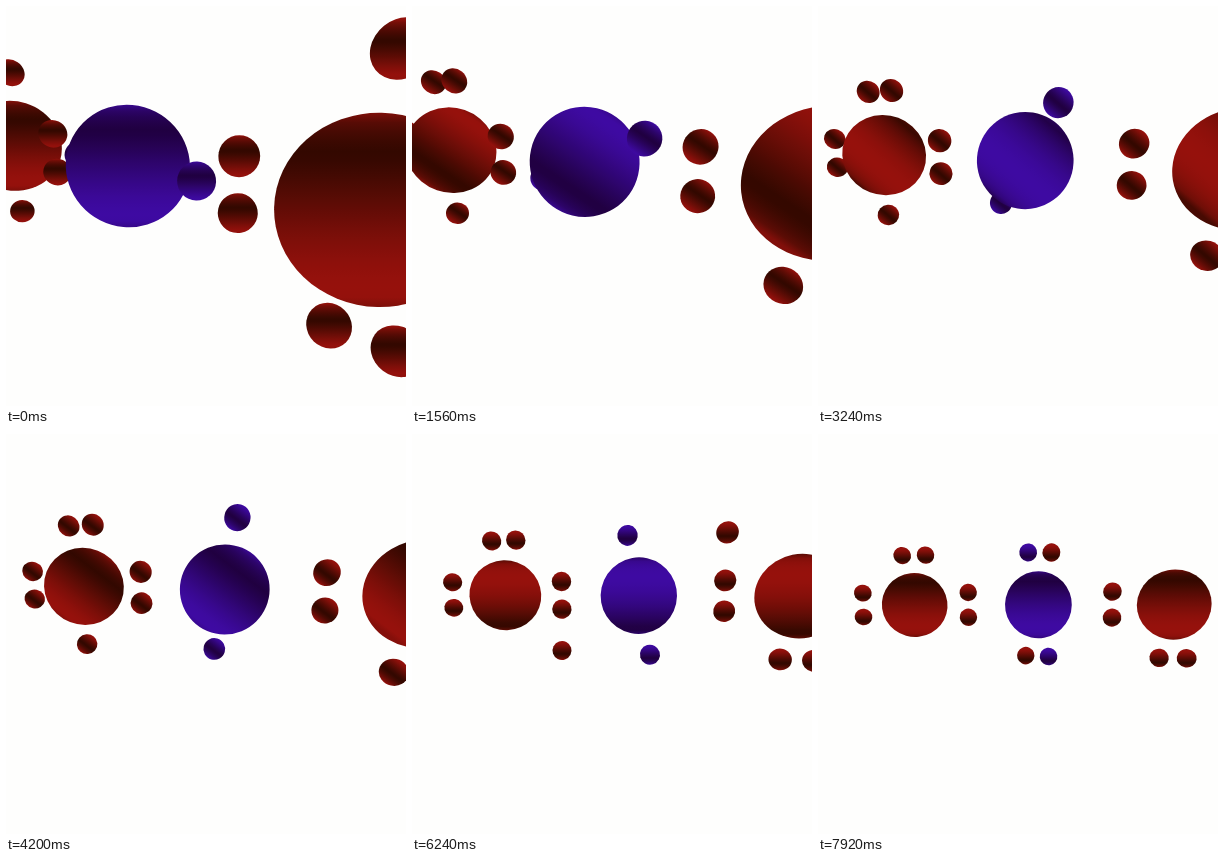
These frames come from a looping animation (400x400 px, 8000 ms). An HTML page with a canvas:

```html
<!DOCTYPE html>
<html lang="en">
<head>
<meta charset="utf-8">
<title>Atoms sharing electrons</title>
<style>
  html, body { margin: 0; width: 100%; height: 100%; overflow: hidden; background: #fefefd; }
  canvas { display: block; width: 400px; height: 400px; }
</style>
</head>
<body>
<canvas id="stage" width="400" height="400"></canvas>
<script>
const ctx = document.getElementById('stage').getContext('2d');
const LOOP = 8, STEP = 0.12;
const FOCAL = 376;
// Lengths in atom radii.
const SPACING = 3.89, SIDE = 1.73, POLE = 1.54, GAP = 0.38, ELECTRON = 0.265;
const SWAP = 4.98, SWAP_TIME = 2.58;
const RED = [[50, 8, 0], [150, 17, 12]];
const BLUE = [[32, 0, 64], [62, 10, 162]];

const clamp = v => Math.min(1, Math.max(0, v));
const mix = (a, b, f) => a.map((v, i) => v + (b[i] - v) * f);

// The camera backs away from the middle atom while it turns level.
function view(t) {
  const yaw = 0.663 - 0.0665 * t, pitch = 0.295 - 0.029 * t;
  const [cy, sy, cp, sp] = [Math.cos(yaw), Math.sin(yaw), Math.cos(pitch), Math.sin(pitch)];
  const mid = [
    -1.28 + 0.549 * t - 0.0291 * t ** 2 - 0.00127 * t ** 3,
    -0.656 - 0.0954 * t - 0.002 * t ** 2 + 0.00133 * t ** 3,
    6.16 + 0.4 * t + 0.031 * t ** 2
  ];
  return ([a, b, c]) => [
    mid[0] + a * cy + c * sy,
    mid[1] + a * sy * sp + b * cp - c * cy * sp,
    mid[2] - a * sy * cp + b * sp + c * cy * cp
  ];
}

// The middle atom's own pair circles it, then rests beside the free slots.
function orbit(t) {
  const s = Math.min(t, SWAP), u = (s / SWAP) ** 1.5;
  const angle = 0.2 * s + 0.00625 * s ** 3;
  const depth = -0.15 * (1 - u) - 0.6 * Math.sin(Math.PI * u);
  const flat = Math.sqrt(POLE ** 2 + GAP ** 2 - depth ** 2);
  return [flat * Math.cos(angle), -flat * Math.sin(angle), depth];
}

function scene(t) {
  const balls = [];
  const add = (pos, size, hue) => balls.push({ pos, size, hue });
  const sidePair = x => [-GAP, GAP].forEach(y => add([x, y, 0], ELECTRON, RED));
  const polePair = (x, y) => [-GAP, GAP].forEach(dx => add([x + dx, y, 0], ELECTRON, RED));

  [-SPACING, 0, SPACING].forEach(x => add([x, 0, 0], 1, x ? RED : BLUE));
  sidePair(-SPACING - SIDE);
  sidePair(-SPACING + SIDE);
  sidePair(SPACING - SIDE);
  polePair(-SPACING, -POLE);
  polePair(SPACING, POLE);

  const f = clamp((t - SWAP) / SWAP_TIME);
  add(mix([-SPACING, POLE, 0], [-GAP, POLE, 0], f), ELECTRON, RED);
  add(mix([SPACING, -POLE, 0], [GAP, -POLE, 0], f), ELECTRON, RED);

  const own = orbit(t);
  add(own, ELECTRON, BLUE);
  add(own.map(v => -v), ELECTRON, BLUE);
  return balls;
}

function drawBall([x, y, z], size, [dark, light], spin, tilt) {
  const r = size * FOCAL / z;
  const px = x * FOCAL / z, py = y * FOCAL / z;
  const stretch = 1 + 0.4 * (px * px + py * py) / FOCAL ** 2;
  ctx.beginPath();
  ctx.ellipse(200 + px, 200 + py, r * stretch, r, Math.atan2(py, px), 0, Math.PI * 2);
  const ax = -Math.sin(tilt) * r, ay = Math.cos(tilt) * r;
  const shade = ctx.createLinearGradient(200 + px - ax, 200 + py - ay, 200 + px + ax, 200 + py + ay);
  for (let i = 0; i <= 20; i++) {
    const glow = Math.abs(Math.sin(Math.acos(1 - i / 10) - spin)) ** 1.3;
    shade.addColorStop(i / 20, `rgb(${mix(dark, light, glow).map(Math.round)})`);
  }
  ctx.fillStyle = shade;
  ctx.fill();
}

function draw(t) {
  ctx.fillStyle = '#fefefd';
  ctx.fillRect(0, 0, 400, 400);
  const project = view(t);
  const tilt = 0.7 * Math.sqrt(Math.max(0, Math.sin(Math.PI * t / 6.2)));
  scene(t)
    .map(b => ({ ...b, pos: project(b.pos) }))
    .sort((a, b) => b.pos[2] - a.pos[2])
    .forEach(b => {
      const spin = b.size === 1 ? 0.95 + 0.77 * t : 1.3 + 0.1 * t;
      drawBall(b.pos, b.size, b.hue, spin, tilt);
    });
}

function tick() {
  const t = performance.now() / 1000 % LOOP;
  draw(Math.floor(t / STEP + 1e-6) * STEP);
  requestAnimationFrame(tick);
}
tick();
</script>
</body>
</html>
```
